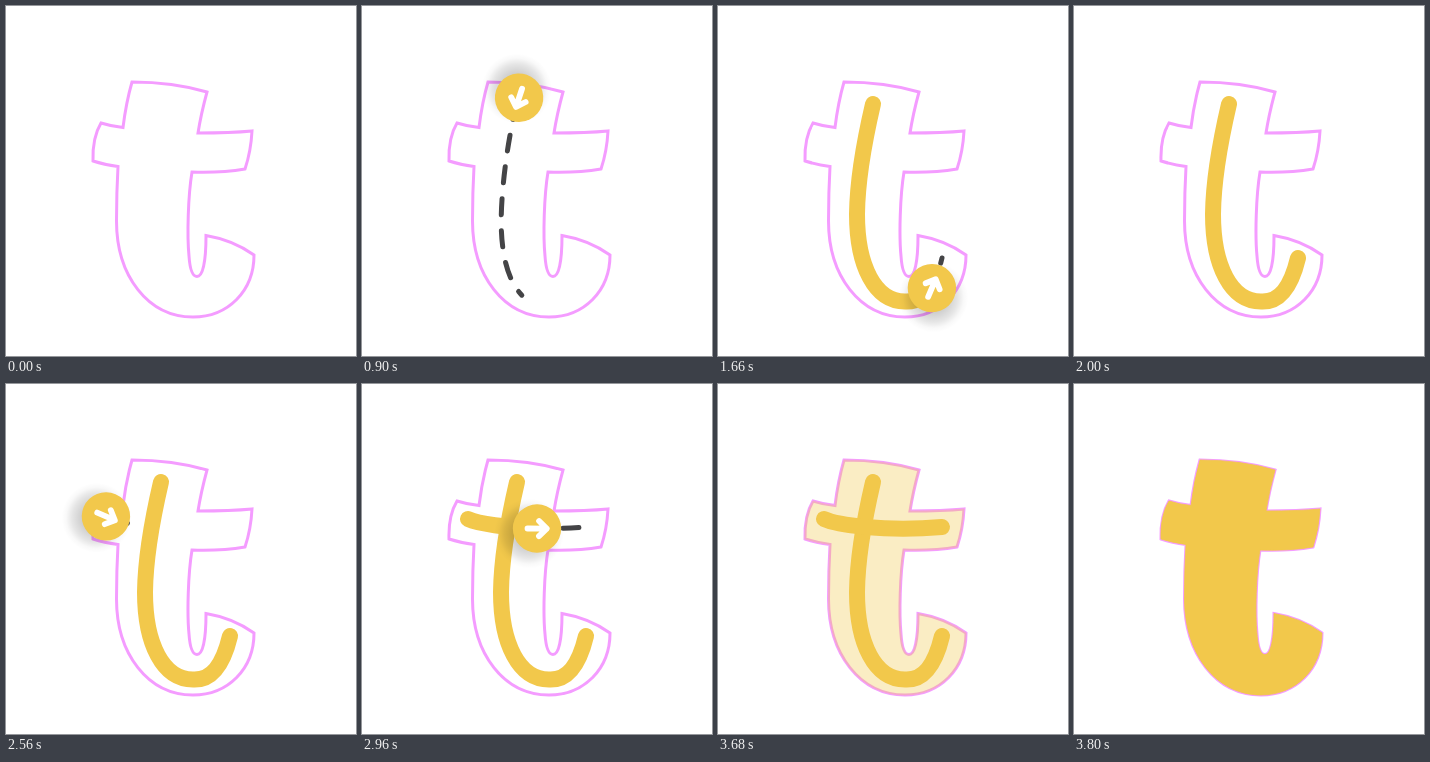
Animation of 350 by 350 pixels, one loop 4800 ms. Source, as an HTML page:

```html
<!DOCTYPE html>
<html lang="en">
<head>
<meta charset="utf-8">
<title>Letter tracing</title>
<style>
  html, body { margin: 0; width: 100%; height: 100%; overflow: hidden; background: #fff; }
  svg { display: block; width: 100vw; height: 100vh; }
  .outline, .dash, .ink, .arrow { fill: none; stroke-linecap: round; stroke-linejoin: round; }
  .outline { stroke: #f49cff; stroke-width: 3; stroke-linejoin: miter; }
  .dash { stroke: #444446; stroke-width: 5; }
  .ink { stroke: #f2c84b; stroke-width: 16; }
  .arrow { stroke: #fff; stroke-width: 5.8; }
  .disc { fill: #f2c84b; }
  .fill { fill: #f2c84b; stroke: #f2c84b; stroke-width: .8; }
</style>
</head>
<body>
<svg viewBox="0 0 350 350">
  <defs>
    <radialGradient id="shade">
      <stop offset=".4" stop-color="#000" stop-opacity=".2"/>
      <stop offset=".7" stop-color="#000" stop-opacity=".1"/>
      <stop offset=".87" stop-color="#000" stop-opacity=".025"/>
      <stop offset="1" stop-color="#000" stop-opacity="0"/>
    </radialGradient>
    <path id="letter" d="M126 76Q167 76 201 86Q195 108 192 127Q225 127 246 125Q245 145 239 163
      Q215 167 186 166C182 190 181 230 183 250C184 265 187 270.5 191 270.5C197 270.5 200 255 200 229.5
      Q227 234 248 249C248 285 222 311 187 311C142 311 110.5 270 110.5 215C110.5 195 111 178 112 160.5
      Q98 158.5 87 155C86.5 140 89 127 95 117Q106 120.5 117 121.5Q120 97 126 76Z"/>
  </defs>
  <use href="#letter" class="outline"/>
  <g id="dashes"></g>
  <g id="inks"></g>
  <use href="#letter" class="fill" id="fill"/>
  <g id="knob">
    <circle cx="-8" cy="5" r="35" fill="url(#shade)"/>
    <circle class="disc" r="24.2"/>
    <path class="arrow" d="M-9.5 0H9.5M2 -7.6L9.7 0L2 7.6"/>
  </g>
</svg>
<script>
const LOOP = 4800, DASH = 16, KNOB_BACK = 6.6;

// Each span is [start, end] in ms.
const strokes = [
  {
    guide: 'M155 98C150.5 111 139.4 170 139.2 215C139.1 264 154 300.5 187 300.5C209 300.5 218 277 224 252',
    ink: 'M155 98C151.5 113 139.5 166 139 208C139 260 157 295.5 187 295.5C206 296.5 217 281 224 252',
    show: [25, 180], draw: [595, 1051], move: [1122, 1787], hide: [1885, 2000]
  },
  {
    guide: 'M106 135C118 140.5 165 148 224 143',
    ink: 'M106 135C118 140.5 165 148 224 143',
    show: [2165, 2320], draw: [2533, 2735], move: [2785, 3082], hide: [3245, 3380]
  }
];
const fillSpan = [3625, 3800];

const $ = id => document.getElementById(id);
const ramp = (t, [a, b]) => Math.min(1, Math.max(0, (t - a) / (b - a)));
const ease = x => (1 - Math.cos(Math.PI * x)) / 2;

function addPath(parent, cls, d) {
  const p = document.createElementNS('http://www.w3.org/2000/svg', 'path');
  p.setAttribute('class', cls);
  p.setAttribute('d', d);
  return parent.appendChild(p);
}

for (const s of strokes) {
  s.dashPath = addPath($('dashes'), 'dash', s.guide);
  s.inkPath = addPath($('inks'), 'ink', s.ink);
  s.length = s.dashPath.getTotalLength();
  s.inkLength = s.inkPath.getTotalLength();
}

// Shows only the dashes lying between two lengths along the path.
function setDashes(path, from, to) {
  const list = [];
  let pos = 0;
  for (let at = 0; at < to; at += 2 * DASH) {
    const a = Math.max(at, from), b = Math.min(at + DASH, to);
    if (b <= a) continue;
    if (!list.length) list.push(0);
    list.push(a - pos, b - a);
    pos = b;
  }
  path.style.display = list.length ? '' : 'none';
  path.setAttribute('stroke-dasharray', [...list, 999].join(' '));
}

function placeKnob(s, p) {
  const at = p * s.length;
  const a = s.dashPath.getPointAtLength(Math.max(0, at - 1));
  const b = s.dashPath.getPointAtLength(Math.min(s.length, at + 1));
  const c = s.dashPath.getPointAtLength(at);
  const angle = Math.atan2(b.y - a.y, b.x - a.x) * 180 / Math.PI;
  $('knob').setAttribute('transform',
    `translate(${c.x} ${c.y}) rotate(${angle}) translate(${-KNOB_BACK} 0)`);
}

function render(t) {
  let alpha = 0;
  for (const s of strokes) {
    const p = ease(ramp(t, s.move));
    setDashes(s.dashPath, p * s.length, ramp(t, s.draw) * s.length);
    s.inkPath.style.display = p > 0 ? '' : 'none';
    s.inkPath.setAttribute('stroke-dasharray', `${p * s.inkLength + (p === 1 ? 1 : 0)} 999`);
    const visible = ramp(t, s.show) * (1 - ramp(t, s.hide));
    if (visible > 0) {
      alpha = visible;
      placeKnob(s, p);
    }
  }
  $('knob').setAttribute('opacity', alpha);
  $('fill').setAttribute('opacity', ramp(t, fillSpan));
}

const start = performance.now();
function tick() {
  render((performance.now() - start) % LOOP);
  requestAnimationFrame(tick);
}
tick();
</script>
</body>
</html>
```
